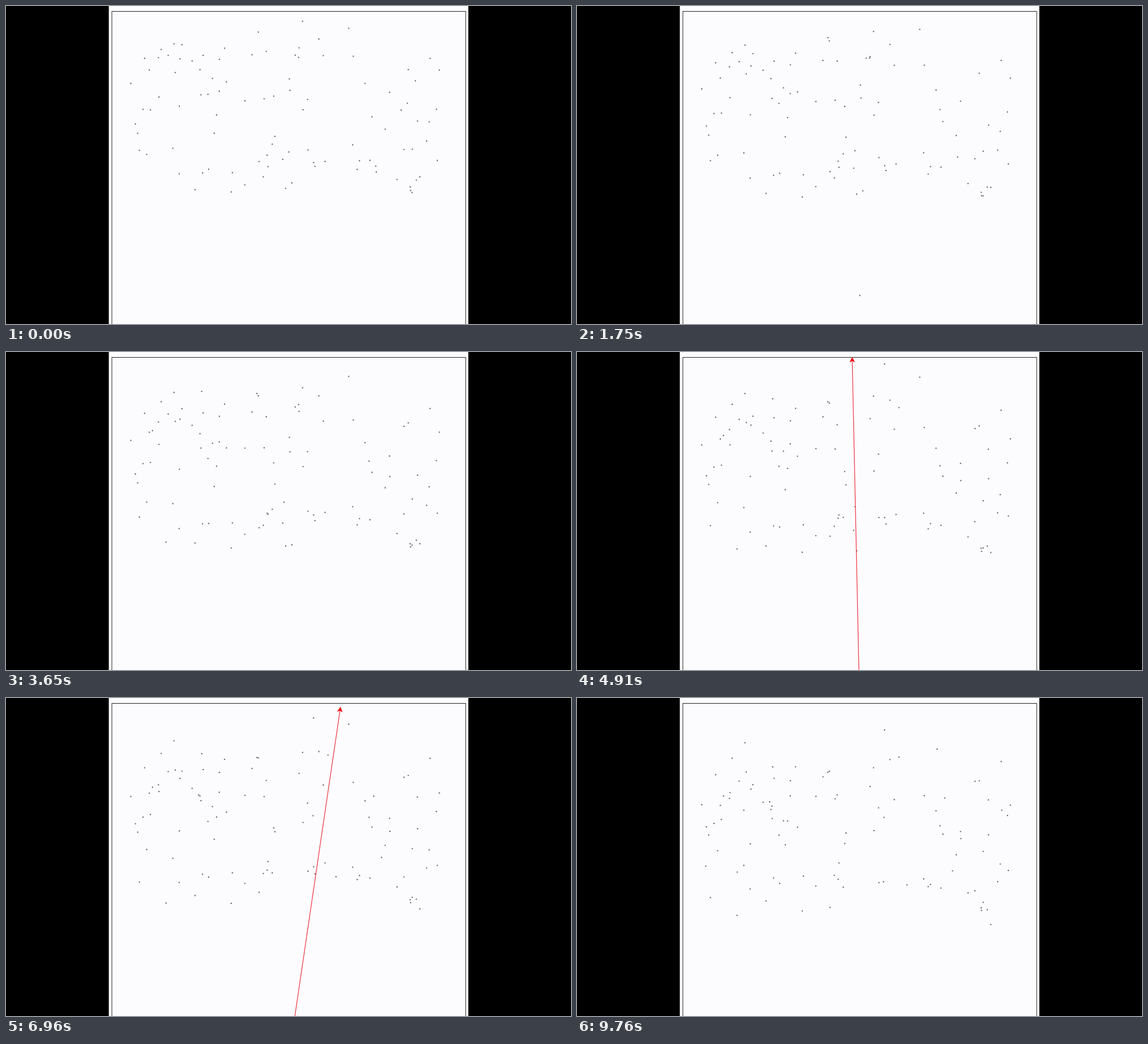
Write an HTML page that moves like this. It is 998 by 561 pixels and loops after 9.81 s.

```html
<!DOCTYPE html>
<html lang="en">
<head>
<meta charset="utf-8">
<title>Falling dots</title>
<style>
html, body { margin: 0; width: 100%; height: 100%; overflow: hidden; background: #000; }
svg { display: block; width: 998px; height: 561px; }
</style>
</head>
<body>
<svg viewBox="0 0 998 561">
  <rect x="181.6" y="0" width="635" height="561" fill="#fcfcfe"/>
  <rect x="187" y="9.5" width="625" height="625" fill="none" stroke="#222"/>
  <g id="dots" fill="#686868"></g>
  <g id="ray">
    <path d="M0 0V-617" stroke="#ee3040" stroke-width="1.2"/>
    <path d="M0-625.5l4.8 9.5-4.8-2-4.8 2z" fill="#f00814"/>
  </g>
</svg>
<script>
const LOOP = 9810, TICK = 304, LEAD = 262;
const MID = 499.5, BASE = 634, REACH = 622;
const FIRST = 98, LATER = 24, ARRIVAL = 390;
const HIT = 8, SHOT_MS = 250;

// Beam shots: start in ms, angle in degrees
const shots = [
  [500, 24], [1950, 26], [2700, 13.7], [3800, 1], [4860, -1.23],
  [5900, 1], [6910, 8.41], [8060, 10.3], [9160, 12]
];

// Shells on the centre line: from, to, y
const shells = [[0, 50, 257.5], [1750, 1950, 510.7]];

const layer = document.getElementById('dots');
const ray = document.getElementById('ray');

let seed = 20;
function rand(a, b) {
  seed = (seed + 0x6d2b79f5) | 0;
  let n = Math.imul(seed ^ (seed >>> 15), 1 | seed);
  n = (n + Math.imul(n ^ (n >>> 7), 61 | n)) ^ n;
  return a + (b - a) * ((n ^ (n >>> 14)) >>> 0) / 2 ** 32;
}

function circle() {
  const el = document.createElementNS('http://www.w3.org/2000/svg', 'circle');
  el.setAttribute('r', 1.2);
  layer.append(el);
  return el;
}

function place(el, on, x, y) {
  el.style.display = on ? '' : 'none';
  el.setAttribute('cx', x);
  el.setAttribute('cy', y);
}

// Dots move in even steps, not continuously
const ticks = t => Math.floor((t + LEAD) / TICK);
const yAt = (d, t) => d.y + d.speed * (ticks(t) - ticks(d.born));

// Distance from the beam's centre line
function offBeam(x, y, deg) {
  const a = deg * Math.PI / 180;
  return Math.abs((x - MID) * Math.cos(a) - (BASE - y) * Math.sin(a));
}

function makeDot(born) {
  let x, y;
  do {
    x = rand(218, 771);
    y = rand(13, 334);
  } while (Math.hypot(x - MID, y - BASE) > REACH);
  const d = { el: circle(), x, y, born, speed: rand(0.1, 3.2) };
  const shot = shots.find(([from, deg]) => {
    const end = from + SHOT_MS;
    return end > born && offBeam(x, yAt(d, end), deg) < HIT;
  });
  d.gone = shot ? shot[0] + SHOT_MS : LOOP;
  return d;
}

const dots = [];
for (let i = 0; i < FIRST + LATER; i++) {
  dots.push(makeDot(Math.max(0, i - FIRST + 1) * ARRIVAL));
}
const shell = circle();

function draw(t) {
  for (const d of dots) place(d.el, t >= d.born && t < d.gone, d.x, yAt(d, t));

  const flying = shells.find(([from, to]) => t >= from && t < to);
  place(shell, flying, MID, flying ? flying[2] : 0);

  // A hit near the loop's shot at 1950 ends before the next pause
  const shot = shots.find(([from]) => t >= from && t < from + SHOT_MS);
  ray.style.display = shot ? '' : 'none';
  if (shot) ray.setAttribute('transform', `translate(${MID} ${BASE}) rotate(${shot[1]})`);
}

const start = performance.now();
function tick() {
  draw((performance.now() - start) % LOOP);
  requestAnimationFrame(tick);
}
draw(0);
requestAnimationFrame(tick);
</script>
</body>
</html>
```
